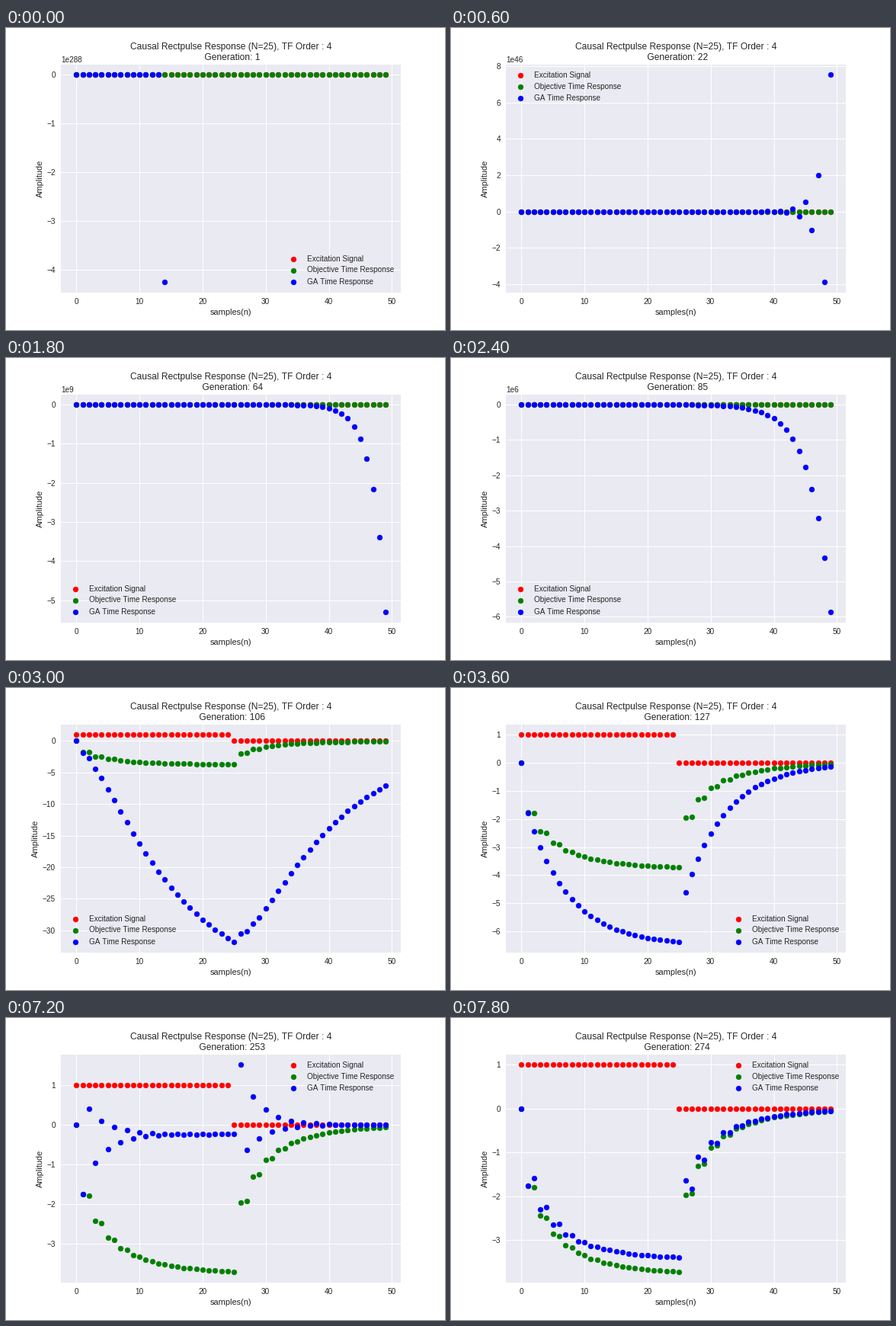
Recreate the animation shown at these times as a matplotlib script. Size 576x396 px, loop 8000 ms.

```python
import numpy as np
import matplotlib.pyplot as plt
from matplotlib.animation import FuncAnimation

plt.style.use("seaborn-v0_8")
plt.rcParams["font.family"] = "sans-serif"
plt.rcParams["font.sans-serif"] = ["Liberation Sans", "DejaVu Sans"]
plt.rcParams["text.kerning_factor"] = 6

SAMPLES = 50
WIDTH = 25
FRAME_MS = 200
FRAMES_PER_STAGE = 3
GENERATION_STEP = 21

n = np.arange(SAMPLES)


def pulse_response(end, *modes):
    """Stable filter: its step response settles at end as each (gain, pole) decays."""
    step = end + sum(gain * pole ** n for gain, pole in modes)
    step[0] = 0
    delayed = np.concatenate([np.zeros(WIDTH), step[:-WIDTH]])
    return step - delayed


def diverging(last, ratio):
    """Unstable filter: grows by ratio per sample up to last."""
    return last * ratio ** (n - SAMPLES + 1.0)


excitation = np.where(n < WIDTH, 1.0, 0.0)
objective = pulse_response(-3.78, (1.23, 0.886), (1.607, 0.725), (0.323, -0.725))

overflow = np.append(np.zeros(14), -4.25e288)
slow = pulse_response(-39.5, (52.7, 0.926), (-14.1, 0.78), (0.2, -0.725))
smooth = pulse_response(-6.5, (5.49, 0.86))
ringing = pulse_response(-0.24, (-0.315, 0.725), (1.56, -0.725), (-1.6, 0.1))
close = pulse_response(-3.44, (1.123, 0.883), (1.41, 0.725), (0.463, -0.725))

stages = [
    overflow,
    diverging(7.53e46, -1.945),
    diverging(-5.9e22, 1.7),
    diverging(-5.3e9, 1.567),
    diverging(-5.86e6, 1.35),
    slow,
    *[smooth] * 2,
    *[ringing] * 5,
    close,
]

fig, ax = plt.subplots(figsize=(8, 5.5), dpi=72)
fig.subplots_adjust(left=0.125, right=0.9, bottom=0.125, top=0.88)


def draw(frame):
    stage = frame // FRAMES_PER_STAGE
    generation = 1 + GENERATION_STEP * stage
    ax.clear()
    for data, color, label in (
        (excitation, "red", "Excitation Signal"),
        (objective, "green", "Objective Time Response"),
        (stages[stage], "blue", "GA Time Response"),
    ):
        ax.scatter(n[:len(data)], data, color=color, label=label)
    ax.set_title("Causal Rectpulse Response (N=25), TF Order : 4\n"
                 f" Generation: {generation}", y=1.0)
    ax.set_xlabel("samples(n)")
    ax.set_ylabel("Amplitude")
    ax.legend(loc="best")
    return []


anim = FuncAnimation(fig, draw, frames=40, interval=FRAME_MS,
                     init_func=lambda: draw(0), repeat=True, repeat_delay=0)
plt.show()
```
